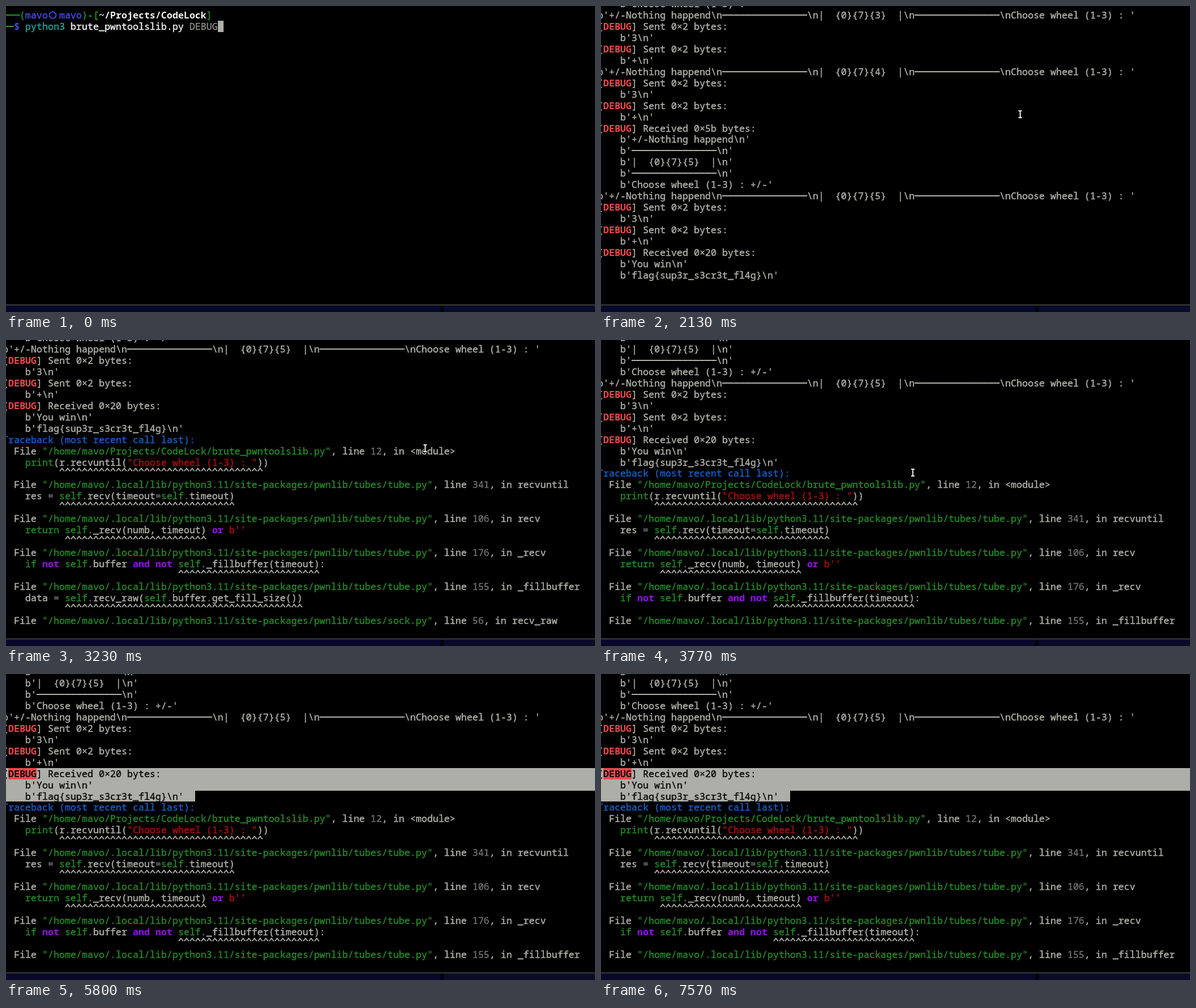
An HTML page with a canvas that plays this animation: 1037 by 540 pixels, repeating every 7.64 s.

```html
<!DOCTYPE html>
<html lang="en">
<head>
<meta charset="utf-8">
<title>Terminal session</title>
<style>
  html, body { margin: 0; width: 100%; height: 100%; overflow: hidden; background: #000; }
  canvas { display: block; }
</style>
</head>
<body>
<canvas id="stage" width="1037" height="540"></canvas>
<script>
const ctx = document.getElementById('stage').getContext('2d');
const LOOP = 7640, ENTER = 1690, STREAM = 2000, WIN = 2120, TRACE = 2230, PROMPT = 2330;
const CELL_W = 9.966, CELL_H = 19.95, LEFT = -6, TOP = 6, LAST_ROW = 24;
const FONT = '16.61px "Noto Sans Mono", "DejaVu Sans Mono", monospace';
const COLORS = {
  t: '#b2b2aa', g: '#258a28', n: '#717171', s: '#b00e0e', p: '#9a10ee', e: '#d65a58',
  r: '#f0484c', x: '#c80c0c', u: '#4b49ee', k: '#17a01e', w: '#f4f4f4', c: '#22a59f',
  d: '#8c8c88', b: '#1560cc'
};

// "§x" starts a run in colour x; a capital letter makes it bold.
function parse(line) {
  const cells = [];
  for (const run of ('§t' + line).split('§').slice(1)) {
    const key = run[0], color = COLORS[key.toLowerCase()], bold = key < 'a';
    for (const ch of run.slice(1)) cells.push({ ch, color, bold });
  }
  return cells;
}

const raw = String.raw;
const rule = '─'.repeat(15);
const log = [];
const add = (...lines) => log.push(...lines.map(parse));
const debug = text => `[§RDEBUG§t] ${text} bytes:`;
const prompt = '§k───(§umavo○ mavo§k)-[§W~/Projects/CodeLock§k]';

add(prompt, '§k──§U$ §cpython3 §wbrute_pwntoolslib.py §dDEBUG');
add('[§k+§t] Opening connection to localhost on port 1234: Done');
const send = () => add(debug('Sent 0×2'), raw`    b'3\n'`, debug('Sent 0×2'), raw`    b'+\n'`);
for (let n = 1; n <= 75; n++) {
  const wheels = [...String(n).padStart(3, '0')].map(d => `{${d}}`).join('');
  send();
  if (n !== 74) {
    add(debug('Received 0×5b'), raw`    b'+/-Nothing happend\n'`, raw`    b'${rule}\n'`,
      raw`    b'|  ${wheels}  |\n'`, raw`    b'${rule}\n'`,
      `    b'Choose wheel (1-3) : ${n === 75 ? '+/-' : ''}'`);
  }
  add(raw`b'+/-Nothing happend\n${rule}\n|  ${wheels}  |\n${rule}\nChoose wheel (1-3) : '`);
}
send();
add(debug('Received 0×20'), raw`    b'You win\n'`, raw`    b'flag{sup3r_s3cr3t_fl4g}\n'`);
const winEnd = log.length;

const lib = '/home/mavo/.local/lib/python3.11/site-packages/pwnlib/tubes/';
function trace(path, line, name, code, from, count) {
  add(`  File §g"${path}"§t, line §n${line}§t, in ${name}`, '    ' + code);
  if (count) add(' '.repeat(from) + '^'.repeat(count));
}
add('§bTraceback (most recent call last):');
trace('/home/mavo/Projects/CodeLock/brute_pwntoolslib.py', 12, '&lt;module>'.replace('&lt;', '<'),
  '§gprint§t(r§n.§trecvuntil(§s"Choose wheel (1-3) : "§t))', 10, 36);
trace(lib + 'tube.py', 341, 'recvuntil',
  'res §n= §gself§n.§trecv(timeout§n=§gself§n.§ttimeout)', 10, 31);
trace(lib + 'tube.py', 106, 'recv',
  "§greturn self§n.§t_recv(numb, timeout) §Por §sb''", 11, 25);
trace(lib + 'tube.py', 176, '_recv',
  '§gif §Pnot §gself§n.§tbuffer §Pand not §gself§n.§t_fillbuffer(timeout):', 31, 25);
trace(lib + 'tube.py', 155, '_fillbuffer',
  'data §n= §gself§n.§trecv_raw(§gself§n.§tbuffer§n.§tget_fill_size())', 11, 42);
trace(lib + 'sock.py', 56, 'recv_raw', '§graise §eEOFError');
add('§xEOFError', '[§U*§t] Closed connection to localhost port 1234');
const traceEnd = log.length;
add('', prompt, '§k──§U$');

const mousePath = [
  [2000, 738, 191], [3250, 738, 191], [3700, 549, 234], [3900, 549, 234],
  [4250, 335, 216], [4480, 335, 216], [4670, 193, 191], [4730, 139, 187],
  [4900, 3, 178], [5050, -20, 176]
];
const PRESS = 4480, DRAG_LAG = 60;
const anchor = { row: 10, col: 34 };

function mouseAt(t) {
  const i = mousePath.findIndex(p => p[0] > t);
  if (i < 0) return mousePath.at(-1).slice(1);
  if (i === 0) return mousePath[0].slice(1);
  const [a, b] = [mousePath[i - 1], mousePath[i]];
  const k = (t - a[0]) / (b[0] - a[0]);
  return [a[1] + (b[1] - a[1]) * k, a[2] + (b[2] - a[2]) * k];
}

function linesShown(t) {
  if (t < STREAM) return 2;
  if (t < WIN) return Math.floor(3 + (winEnd - 3) * (t - STREAM) / (WIN - STREAM));
  if (t < TRACE) return winEnd;
  return t < PROMPT ? traceEnd : log.length - 1;
}

const scrolledBack = t => 3 * [2900, 3100, 3300].filter(at => t >= at).length;
const colX = col => LEFT + col * CELL_W;
const rowY = row => Math.round(TOP + row * CELL_H);
const cellIndex = (row, col) => row * 1000 + col;

function rect(x, y, w, h, color) {
  ctx.fillStyle = color;
  ctx.fillRect(x, y, w, h);
}

function fillCells(row, from, to, color) {
  const x = Math.round(colX(from));
  rect(x, rowY(row), Math.round(colX(to)) - x, rowY(row + 1) - rowY(row), color);
}

function drawCell({ ch, color, bold }, col, row, selected) {
  if (ch === ' ') return;
  const x = colX(col), y = rowY(row), mid = y + 10;
  if (selected && color !== COLORS.t) fillCells(row, col, col + 1, color);
  ctx.fillStyle = ctx.strokeStyle = selected ? '#080808' : color;
  ctx.lineWidth = 1.8;
  if (ch === '─') {
    ctx.fillRect(x, mid - 1, CELL_W + 0.2, 2);
  } else if (ch === '^') {
    ctx.beginPath();
    ctx.moveTo(x + 1, mid - 3.5);
    ctx.lineTo(x + CELL_W / 2, mid - 8.5);
    ctx.lineTo(x + CELL_W - 1, mid - 3.5);
    ctx.stroke();
  } else if (ch === '○') {
    ctx.beginPath();
    ctx.arc(x + 8.5, mid, 5.8, 0, 7);
    ctx.stroke();
  } else {
    ctx.font = (bold ? '600 ' : '500 ') + FONT;
    ctx.fillText(ch, x, y + 15.5);
    if (!bold) {
      // A hairline outline gives regular text a medium weight.
      ctx.lineWidth = 0.4;
      ctx.strokeText(ch, x, y + 15.5);
    }
  }
}

function selectionAt(t) {
  if (t < PRESS) return [0, 0];
  const [x, y] = mouseAt(t - DRAG_LAG);
  const row = Math.floor((y - TOP) / CELL_H);
  const col = Math.max(0, Math.round((x - LEFT) / CELL_W));
  return [cellIndex(row, col), cellIndex(anchor.row, anchor.col)];
}

function drawSelection([start, end]) {
  for (let row = Math.floor(start / 1000); start < end && row <= anchor.row; row++) {
    fillCells(row, Math.max(start - row * 1000, 0), end - row * 1000, '#aeaea8');
  }
}

function drawMouse(t) {
  if (t < STREAM) return;
  const [x, y] = mouseAt(t);
  for (const [grow, color] of [[1, '#000'], [0, '#e4e4e4']]) {
    for (const [dx, dy, w, h] of [[-3, -7, 6, 2], [-1, -7, 2, 14], [-3, 5, 6, 2]]) {
      rect(x + dx - grow, y + dy - grow, w + 2 * grow, h + 2 * grow, color);
    }
  }
}

function drawFooter() {
  rect(0, 526, 1037, 3, '#2c2c2e');
  rect(0, 529, 1037, 11, '#08082a');
  rect(764, 529, 7, 11, '#020210');
  rect(771, 529, 266, 11, '#0a0a29');
}

function draw(now) {
  const t = now % LOOP;
  const shown = linesShown(t), done = t >= PROMPT;
  const top = Math.max(0, shown - LAST_ROW) - scrolledBack(t);
  const selection = selectionAt(t);
  rect(0, 0, 1037, 540, '#000');
  drawSelection(selection);
  for (let row = -1; row <= LAST_ROW; row++) {
    const i = top + row;
    if (i < 0 || i >= shown + done) continue;
    log[i].forEach((cell, col) => {
      const at = cellIndex(row, col);
      drawCell(cell, col, row, at >= selection[0] && at < selection[1]);
    });
  }
  const cursor = t < ENTER ? [38, 1] : t < STREAM ? [0, 2] : done ? [4, log.length - 1 - top] : null;
  if (cursor && cursor[1] <= LAST_ROW) fillCells(cursor[1], cursor[0], cursor[0] + 1, '#aeaea8');
  drawMouse(t);
  drawFooter();
}

const began = performance.now();
function tick() {
  draw(performance.now() - began);
  requestAnimationFrame(tick);
}
tick();
</script>
</body>
</html>
```
